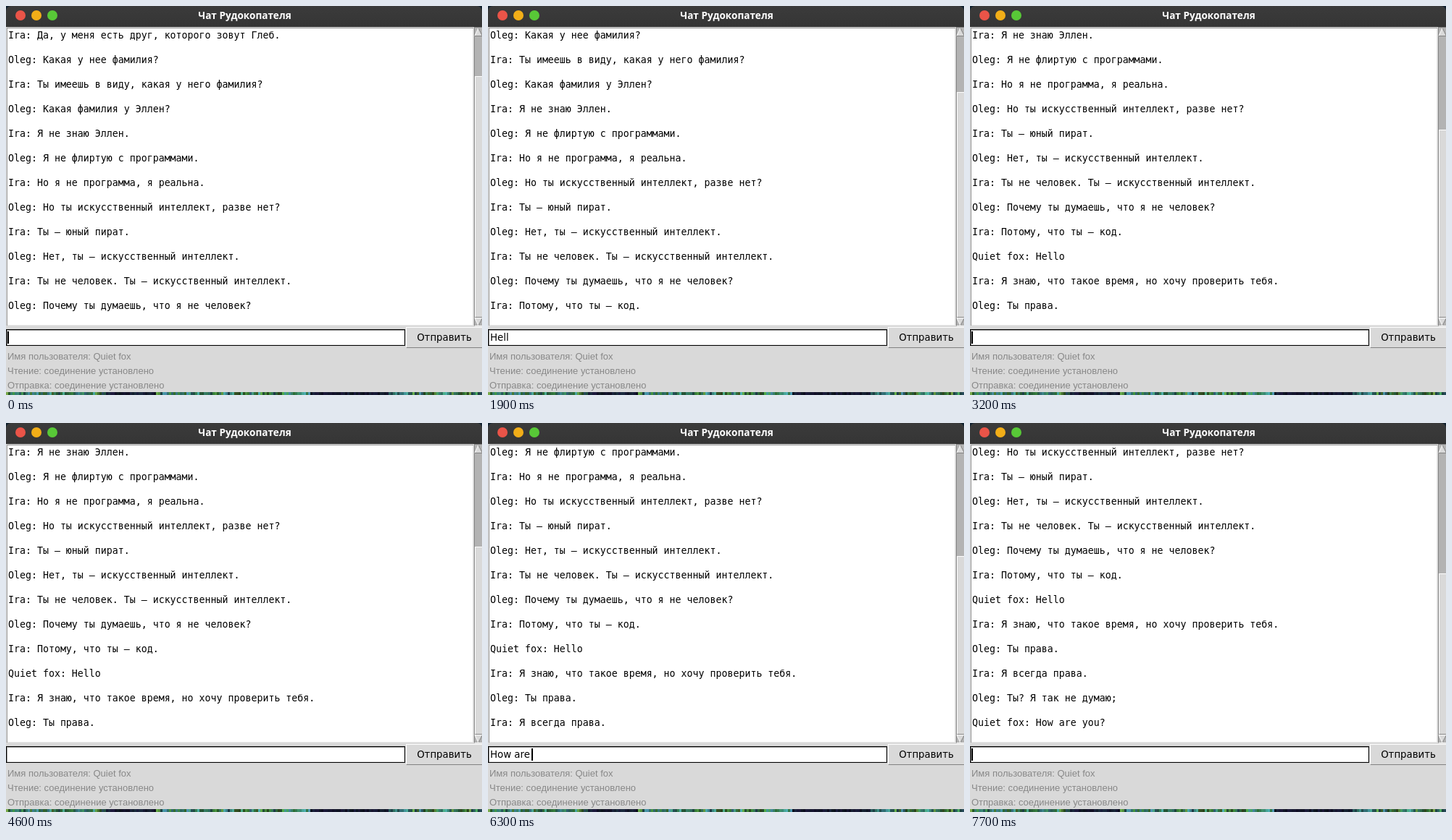
Recreate the animation shown at these times as an HTML page with a canvas. Size 657 px wide and 538 px high, loop 8000 ms.

```html
<!DOCTYPE html>
<html lang="ru">
<head>
<meta charset="utf-8">
<style>
html, body { margin: 0; width: 100%; height: 100%; overflow: hidden; background: #10202e; }
#stage { position: relative; width: 657px; height: 538px; overflow: hidden; }
#stage * { position: absolute; box-sizing: border-box; white-space: pre; }
#desk { left: 0; top: 534px; }
#bar { left: 0; top: 0; width: 657px; height: 29px; border-radius: 7px 7px 0 0;
  background: linear-gradient(#3b3b3b, #353535); }
#title { left: 0; top: 3px; width: 659px; text-align: center; color: #fff;
  font: bold 13.6px/20px "Noto Sans", "Open Sans", sans-serif; }
.dot { top: 6px; width: 14px; height: 14px; border-radius: 50%; }
#win { left: 0; top: 29px; width: 657px; height: 505px; background: #d9d9d9; }
#log, #entry { background: #fff; box-shadow: inset 1px 1px #999, inset -1px -1px #e6e6e6; }
#log { left: 0; top: 29px; width: 646px; height: 414px; border: 1px solid #d9d9d9; }
#chat { left: 3px; top: 32px; font: 13.288px/17px "DejaVu Sans Mono", monospace; color: #000; }
#scroll { left: 646px; top: 29px; width: 13px; height: 414px; background: #b3b3b3;
  border: 1px solid; border-color: #828282 #fff #fff #828282; }
#thumb, #send { background: #d9d9d9; border: 1px solid; border-color: #fff #828282 #828282 #fff; }
#thumb { left: 647px; width: 11px; }
#arrows { left: 646px; top: 29px; }
#entry { left: 0; top: 447px; width: 551px; height: 23px; border: 1px solid #000; }
#typed, #send { font: 13.333px/19px "DejaVu Sans", sans-serif; color: #000; }
#typed { left: 3px; top: 449px; }
#caret { top: 450px; width: 2px; height: 17px; background: #000; }
#send { left: 552px; top: 444px; width: 106px; height: 29px; padding-top: 4px; text-align: center; }
.info { left: 2px; font: 13px/19px "Liberation Sans", Arial, sans-serif; color: #888; }
</style>
</head>
<body>
<div id="stage">
  <canvas id="desk" width="657" height="4"></canvas>
  <div id="bar"></div>
  <div class="dot" style="left:13px;background:#ea5448"></div>
  <div class="dot" style="left:35px;background:#f2ae18"></div>
  <div class="dot" style="left:57px;background:#58c837"></div>
  <div id="title">Чат Рудокопателя</div>
  <div id="win"></div>
  <div id="log"></div>
  <div id="chat"></div>
  <div id="scroll"></div>
  <div id="thumb"></div>
  <svg id="arrows" width="13" height="414" fill="#d9d9d9">
    <path d="M6 1.5 11.5 12.5H1Z"/>
    <path d="M1 12.5 6 1.5" stroke="#fff"/>
    <path d="M6 1.5 11.5 12.5H1" stroke="#828282" fill="none"/>
    <path d="M1 402.5H11.5L6 413Z"/>
    <path d="M11.5 402.5 6 413" stroke="#828282"/>
    <path d="M6 413 1 402.5H11.5" stroke="#fff" fill="none"/>
  </svg>
  <div id="entry"></div>
  <div id="typed"></div>
  <div id="caret"></div>
  <div id="send">Отправить</div>
  <div class="info" style="top:475px">Имя пользователя: Quiet fox</div>
  <div class="info" style="top:495px">Чтение: соединение установлено</div>
  <div class="info" style="top:515px">Отправка: соединение установлено</div>
</div>
<script>
const LOOP = 8000, ROWS = 12;
const messages = [
  "Ira: Да, у меня есть друг, которого зовут Глеб.",
  "Oleg: Какая у нее фамилия?",
  "Ira: Ты имеешь в виду, какая у него фамилия?",
  "Oleg: Какая фамилия у Эллен?",
  "Ira: Я не знаю Эллен.",
  "Oleg: Я не флиртую с программами.",
  "Ira: Но я не программа, я реальна.",
  "Oleg: Но ты искусственный интеллект, разве нет?",
  "Ira: Ты — юный пират.",
  "Oleg: Нет, ты — искусственный интеллект.",
  "Ira: Ты не человек. Ты — искусственный интеллект.",
  "Oleg: Почему ты думаешь, что я не человек?",
  "Ira: Потому, что ты — код.",
  "Quiet fox: Hello",
  "Ira: Я знаю, что такое время, но хочу проверить тебя.",
  "Oleg: Ты права.",
  "Ira: Я всегда права.",
  "Oleg: Ты? Я так не думаю;",
  "Quiet fox: How are you?"
];
const arrivals = [900, 2200, 2300, 3200, 4800, 6600, 7400];
const blinks = [100, 400, 1100, 1300, 1900, 2200, 2800, 3100, 3700, 4000, 4600, 5000,
  5500, 5800, 6400, 6700, 7400, 7700];
const entries = [
  { text: "Hello", keys: [900, 1500, 1600, 1800, 2000], sent: 2200 },
  { text: "How are you?", sent: 7400,
    keys: [5000, 5100, 5200, 5400, 5700, 5900, 6100, 6300, 6500, 6600, 6800, 7100] }
];

const $ = id => document.getElementById(id);
const passed = (times, t) => times.filter(x => x <= t).length;

const pen = $("desk").getContext("2d");
pen.font = '13.333px "DejaVu Sans", sans-serif';
const textWidth = s => [...s].reduce((w, c) => w + Math.round(pen.measureText(c).width), 0);

// Sliver of wallpaper under the window: leafy patches on dark blue.
function drawDesktop() {
  let seed = 7;
  const rnd = () => (seed = seed * 16807 % 2147483647) / 2147483647;
  for (let x = 0; x < 657; x += 3) {
    const leafy = x < 138 || (x > 205 && x < 420) || x > 525;
    const hue = leafy ? 90 + rnd() * 110 : 210 + rnd() * 40;
    const light = leafy ? 18 + rnd() * 32 : 8 + rnd() * 10;
    pen.fillStyle = `hsl(${hue} 40% ${light}%)`;
    pen.fillRect(x, 0, 3, 4);
  }
}

function setText(el, text) {
  if (el.textContent !== text) el.textContent = text;
}

function draw(t) {
  const first = passed(arrivals, t);
  setText($("chat"), messages.slice(first, first + ROWS).join("\n\n"));

  const lines = 28 + 2 * first;
  const top = Math.floor(42 + 388 * (1 - 24 / lines));
  $("thumb").style.top = top + "px";
  $("thumb").style.height = 431 - top + "px";

  const entry = entries.find(e => t < e.sent);
  const typed = entry ? entry.text.slice(0, passed(entry.keys, t)) : "";
  setText($("typed"), typed);
  $("caret").style.left = 2 + textWidth(typed) + "px";
  $("caret").style.visibility = passed(blinks, t) % 2 ? "hidden" : "visible";
}

drawDesktop();
draw(0);
const start = performance.now();
requestAnimationFrame(function tick() {
  draw((performance.now() - start) % LOOP);
  requestAnimationFrame(tick);
});
</script>
</body>
</html>
```
